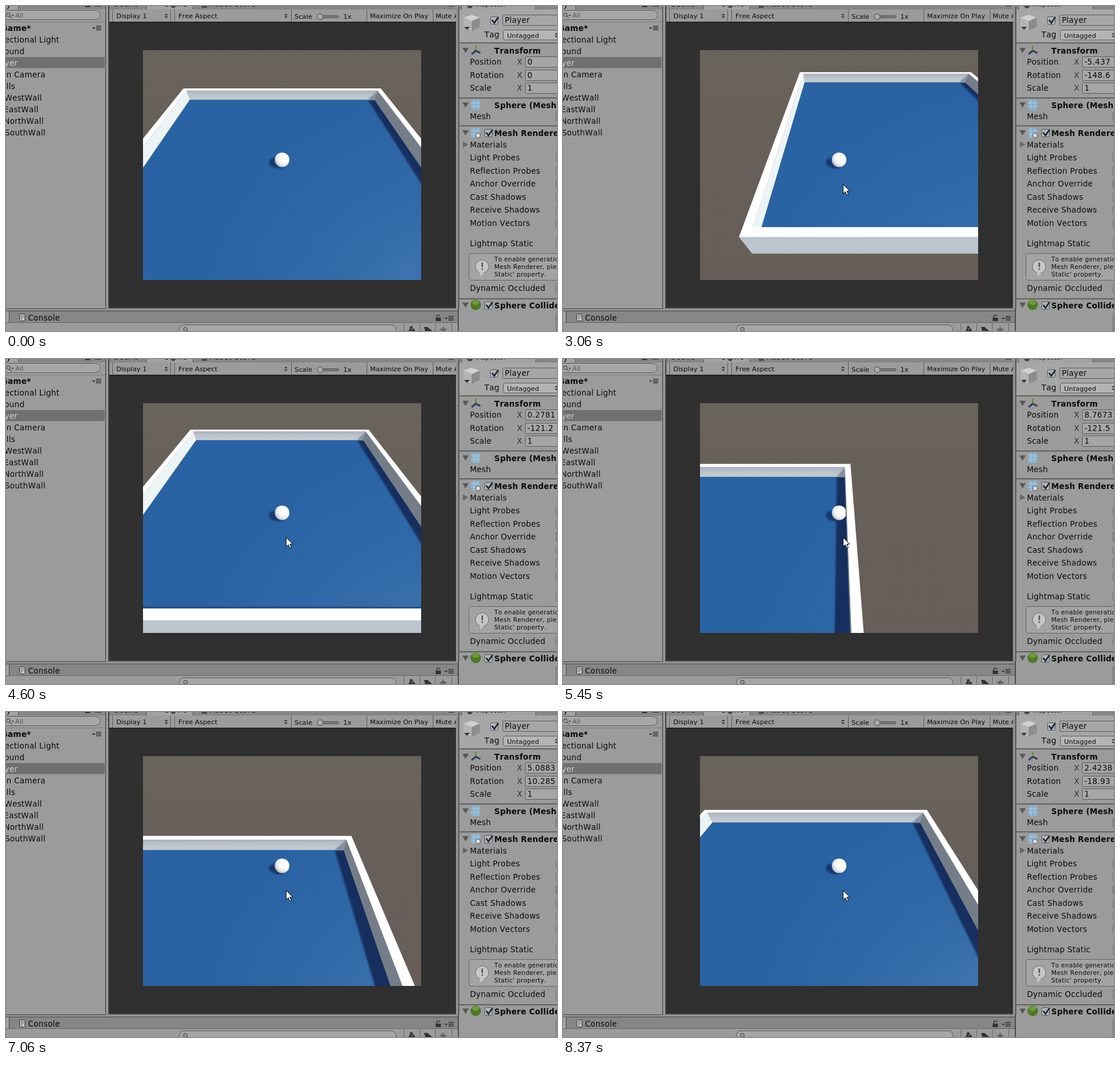
Animation, 949 px wide and 560 px high, one loop 8450 ms. Source, as an HTML page with a canvas:

```html
<!DOCTYPE html>
<html lang="en">
<head>
<meta charset="utf-8">
<title>Rolling ball in an editor</title>
<style>
html, body { margin: 0; width: 949px; height: 560px; overflow: hidden; background: #9b9b9b; }
svg, canvas { position: absolute; left: 0; top: 0; }
canvas { left: 236px; top: 76px; }
text { font: 13.4px "DejaVu Sans", sans-serif; letter-spacing: .25px; font-kerning: none; fill: #0a0a0a; white-space: pre; }
.b { font-weight: bold; font-size: 13.4px; }
.s { font-size: 11.2px; letter-spacing: .05px; }
.h { font-size: 10.5px; letter-spacing: .28px; }
.e { text-anchor: end; }
</style>
</head>
<body>
<svg id="ui" width="949" height="560"></svg>
<canvas id="view" width="479" height="396"></canvas>
<script>
// ---------- editor panels ----------
const PANEL = '#9b9b9b', STRIP = '#868686', TAB = '#a2a2a2';
const rect = (x, y, w, h, fill, more = '') =>
  `<rect x="${x}" y="${y}" width="${w}" height="${h}" fill="${fill}" ${more}/>`;
const path = (d, fill, more = '') => `<path d="${d}" fill="${fill}" ${more}/>`;
const text = (x, y, s, cls = '', more = '') => `<text x="${x}" y="${y}" class="${cls}" ${more}>${s}</text>`;
const line = (d, color = '#555', w = 1) => path(d, 'none', `stroke="${color}" stroke-width="${w}"`);
const field = (x, y, w, h, rx = 1, fill = '#a6a6a6') =>
  rect(x + .5, y + .5, w, h, fill, `rx="${rx}" stroke="#5c5c5c"`);
const stepper = (x, y) => path(`M${x} ${y - 1}h6l-3-3zM${x} ${y + 1}h6l-3 3z`, '#333');
const foldout = y => path(`M786 ${y}h11l-5.5 9z`, '#585858');
const check = (x, y) => rect(x + .5, y + .5, 13, 13, '#b4b4b4', 'rx="2" stroke="#555"') +
  line(`M${x + 3} ${y + 6}l4 5l7-10`, '#16243c', 2.6);
const menu = (x, y) => path(`M${x} ${y + 2}h6l-3 3z`, '#333') +
  line(`M${x + 7} ${y}h9m-9 3h9m-9 3h9`, '#333', 1.4);
const lens = (x, y) => `<circle cx="${x}" cy="${y}" r="3" fill="none" stroke="#555" stroke-width="1.3"/>` +
  line(`M${x + 2} ${y + 2}l4 4`, '#555', 1.5);

const hierarchy = () => rect(0, 0, 171, 521, PANEL) + rect(0, 0, 171, 6, STRIP) +
  rect(0, 0, 21, 6, TAB) + rect(21, 0, 1, 6, '#555') +
  text(9, 2, 'y', 'e') + rect(136, 0, 9, 2, '#333') + rect(153, 0, 12, 1, '#333') +
  field(-20, 7, 182, 16, 8) + lens(4, 15) + path('M9 15h5l-2.5 3z', '#555') +
  text(16, 20, 'All', 's', 'style="fill:#555"') + rect(0, 27, 171, 1, '#7d7d7d') +
  text(43, 43, 'Game*', 'b e') + menu(148, 35) + rect(0, 88, 170, 19, '#707070') +
  [['Directional Light', 92], ['Ground', 32], ['Player', 20], ['Main Camera', 68], ['Walls', 16],
   ['WestWall', 62], ['EastWall', 56], ['NorthWall', 65], ['SouthWall', 68]]
    .map(([s, x], i) => text(x, 63 + 20 * i, s, 'e', i == 2 ? 'style="fill:#d0d0d0"' : '')).join('') +
  rect(171, 0, 1.5, 522, '#444') + rect(172.5, 0, 3, 522, PANEL);

const gamePanel = () => rect(176, 0, 600, 521, '#414141') + rect(178, 0, 597, 7, STRIP) +
  rect(242, 0, 80, 6, TAB) + line('M242 0v6M322 0v6') +
  text(186, 1, 'Scene') + text(271, 1, 'Game') + text(351, 1, 'Asset Store') +
  '<circle cx="288" cy="0" r="3.5" fill="#444"/>' + rect(337, 0, 9, 3, '#444') + rect(762, 0, 10, 1, '#333') +
  rect(178, 6, 597, 21, PANEL) + rect(178, 27, 597, 492, '#303030') +
  rect(178, 27, 597, 2, '#222') +
  line('M183.5 6v21M283.5 6v21M290.5 6v21M491.5 6v21M621.5 6v21M735.5 6v21', '#5d5d5d') +
  text(190, 21, 'Display 1', 's') + stepper(273, 17) + text(297, 21, 'Free Aspect', 's') + stepper(479, 17) +
  text(497, 22, 'Scale', 's') + field(536, 16, 37, 4, 2, '#777') +
  '<circle cx="541" cy="18.5" r="5" fill="#aaa" stroke="#444"/>' + text(581, 22, '1x', 's') +
  text(627, 21, 'Maximize On Play', 's') + text(740, 21, 'Mute Audio', 's') +
  rect(775, 0, 6, 521, '#929292') + rect(779, 0, 1.5, 521, '#444');

const bottomPanel = () => rect(0, 521, 780, 5, '#929292') + rect(0, 521, 172, 1, '#444') +
  rect(0, 525, 778, 1, '#4b4b4b') + rect(0, 526, 778, 20, STRIP) + rect(0, 526, 5, 20, TAB) +
  line('M5.5 526v20', '#444') + rect(23.5, 530.5, 9, 12, '#ccc', 'stroke="#333" rx="1"') +
  line('M25 533h6m-6 3h6m-6 3h4', '#444') + text(38, 542, 'Console') +
  rect(740, 537, 9, 6, '#333') + line('M742 537v-2a2.5 2.5 0 0 1 5 0', '#333', 1.4) + menu(755, 535) +
  rect(0, 546, 778, 14, PANEL) + rect(0, 545, 778, 1, '#686868') + field(298, 549, 373, 18, 8) + lens(309, 557) +
  line('M685.5 547v13M712.5 547v13M739.5 547v13M767.5 547v13', '#666') +
  '<circle cx="698" cy="554" r="2.5" fill="#333"/>' + path('M693 560l3-5l3 3l3-3l3 5z', '#333') +
  path('M720 553h6l8 7h-12z', '#333') + path('M753 551l2 5h5l-4 4h-6l-4-4h5z', '#666') +
  rect(778, 521, 2, 39, '#4b4b4b');

const inspector = () => rect(781, 0, 168, 560, PANEL) + rect(781, 0, 168, 6, STRIP) +
  rect(784, 0, 128, 6, TAB) + line('M784.5 0v6M912.5 0v6') + text(809, 1, 'Inspector', 's') +
  '<circle cx="799" cy="-1" r="5" fill="#444"/>' + rect(781, 6, 168, 57, '#a6a6a6') +
  path('M788 20l14-5l14 5l-14 6z', '#d0d0d0') + path('M788 20l14 6v17l-14-7z', '#b4b4b4') +
  path('M816 20l-14 6v17l14-7z', '#8c8c8c') + path('M789 36h10l-5 5z', '#333') +
  check(834, 18) + field(855, 15, 110, 18) + text(859, 29, 'Player') + text(824, 54, 'Tag') +
  field(856, 41, 110, 17, 3, '#b4b4b4') + text(863, 55, 'Untagged', 's') + stepper(945, 50) +
  line('M781 63.5h168', '#4c4c4c', 1.5) + line('M781 158.5h168M781 206.5h168M781 504.5h168', '#4c4c4c', 1.5) +
  [72, 166, 214, 511].map(foldout).join('') + path('M787 233v11l9-5.5z', '#666') +
  line('M809 77v-9', '#6d8a2b', 2.5) + line('M809 77l-7 6', '#263f78', 3) + line('M809 77l8 4', '#2b3a52', 3) +
  text(841, 82, 'Transform', 'b') +
  ['Position', 'Rotation', 'Scale'].map((s, i) => {
    const y = [101, 124, 146][i];
    return text(799, y, s) + text(880, y, 'X', '', 'style="fill:#333"') + field(894, y - 14, 80, 18) +
      text(898, y, i < 2 ? '0' : '1', '', `id="n${i}"`);
  }).join('') +
  [162, 210].map(y => rect(801, y, 16, 17, '#86b0cf', 'rx="3"') +
    line(`M801 ${y + 5}h16m-16 6h16M806 ${y}v17m6-17v17`, '#aecbde')).join('') +
  '<circle cx="813" cy="223" r="4" fill="#ddd" stroke="#555"/>' +
  text(841, 176, 'Sphere (Mesh Filter)', 'b') + text(799, 195, 'Mesh') + field(947, 182, 9, 16) +
  check(824, 212) + text(841, 224, 'Mesh Renderer', 'b') +
  [['Materials', 244], ['Light Probes', 266], ['Reflection Probes', 289], ['Anchor Override', 311],
   ['Cast Shadows', 334], ['Receive Shadows', 356], ['Motion Vectors', 379], ['Lightmap Static', 414],
   ['Dynamic Occluded', 491]].map(([s, y], i) => text(799, y, s) +
    (i ? field(947, y - 13, 9, 16, 2, i == 3 ? '#a0a0a0' : '#bcbcbc') : '')).join('') +
  rect(797.5, 426.5, 170, 46, '#a3a3a3', 'rx="4" stroke="#666"') +
  '<circle cx="820" cy="449" r="11.5" fill="#c6c6c6" stroke="#666"/>' +
  path('M816 459l1 7l7-6z', '#c6c6c6') + rect(819, 442, 2.5, 8, '#555') + rect(819, 452, 2.5, 2.5, '#555') +
  ['To enable generation of', 'Mesh Renderer, please', "Static' property."]
    .map((s, i) => text(841, 440 + 13 * i, s, 'h')).join('') +
  '<circle cx="809" cy="515" r="9" fill="#4d7a22"/><ellipse cx="809" cy="511" rx="6" ry="4" fill="#6f9c3c"/>' +
  check(824, 509) + text(841, 521, 'Sphere Collider', 'b') + field(947, 529, 9, 40);

document.getElementById('ui').innerHTML = hierarchy() + gamePanel() + bottomPanel() + inspector();
const readouts = [0, 1].map(i => document.getElementById('n' + i));

// ---------- motion: step, ball x, ball z, shown position, shown rotation ----------
const START = 1440, STEP = 77, LOOP = 8450, LIMIT = 9.25;
const keys = [
  [-1, 0, 0, 0, 0], [3, -.17, -.01, -.06, -.4], [7, -.75, -.16, -.479, -4.059],
  [10, -1.6, -.75, -1.25, -18], [15, -3.5, -2.3, -3.15, -75], [21, -5.55, -4.47, -5.437, -148.6],
  [24, -5.8, -5.6, -5.78, -170], [28, -5.3, -6.15, -5.5, -160], [33, -3.6, -5.6, -4, -138],
  [41, .29, -3.13, .2781, -121.2], [47, 4.75, .4, 4.2, -121.3], [52, 9.25, 4.54, 8.7673, -121.5],
  [54, 11, 6.25, 10.5, -112], [58, 9.5, 9.7, 9.6, -85], [62, 8.2, 9.8, 8.5, -50],
  [67, 6.6, 8.9, 6.9, -12], [73, 4.87, 7.39, 5.0883, 10.285], [81, 3.5, 5.4, 3.75, 2],
  [90, 2.15, 3.29, 2.4238, -18.93]];

const secant = (i, c) => (keys[i + 1][c] - keys[i][c]) / (keys[i + 1][0] - keys[i][0]);
function tangent(i, c) {
  if (!i) return 0;
  const a = secant(i - 1, c);
  if (i == keys.length - 1) return a;
  const b = secant(i, c);
  return a * b > 0 ? 2 * a * b / (a + b) : 0;
}
function curve(k, c) {
  const i = keys.findIndex(r => r[0] >= k);
  if (i < 1) return keys[0][c];
  const [p, q] = [keys[i - 1], keys[i]], w = q[0] - p[0], u = (k - p[0]) / w, v = 1 - u;
  return p[c] * v * v * (1 + 2 * u) + q[c] * u * u * (3 - 2 * u) +
    w * u * v * (v * tangent(i - 1, c) - u * tangent(i, c));
}
const bound = v => Math.max(-LIMIT, Math.min(LIMIT, v));
const show = v => v ? v.toFixed(5).slice(0, 6) : '0';

// ---------- game view ----------
const g = document.getElementById('view').getContext('2d');
g.translate(-236, -76);
const blend = (grad, ...colors) => {
  colors.forEach((c, i) => grad.addColorStop(i / (colors.length - 1), c));
  return grad;
};
const sky = blend(g.createLinearGradient(0, 76, 0, 472), '#69645c', '#675f59', '#675e59');
const felt = blend(g.createRadialGradient(760, 570, 0, 760, 570, 430), '#477cb8', '#336ba9', '#2963a4');
const shine = blend(g.createRadialGradient(480, 261, 3, 480, 261, 19), '#fff', '#fdfdfd', '#e8e9ec', '#a9adb5');
const SHADE = '#162f5f', IN = 9.75, OUT = 10.25;
let bx = 0, bz = 0;

// Camera sits 10 above and 10 behind the ball, pitched down 45 degrees
function project([x, y, z]) {
  const d = Math.max(z - bz + 10, 1), h = y - 10;
  return [475.5 + 485 * (x - bx) / (d - h), 274 - 342.95 * (d + h) / (d - h)];
}
function shape(fill, ...loops) {
  g.beginPath();
  for (const pts of loops) {
    pts.forEach((p, i) => g[i ? 'lineTo' : 'moveTo'](...project(p)));
    g.closePath();
  }
  g.fillStyle = fill;
  g.fill('evenodd');
}
const flat = (x0, x1, z0, z1, y) => [[x0, y, z0], [x1, y, z0], [x1, y, z1], [x0, y, z1]];
const side = (x, z0, z1) => [[x, 0, z0], [x, 1, z0], [x, 1, z1], [x, 0, z1]];

function soft(blur, draw) {
  g.filter = `blur(${blur}px)`;
  draw();
  g.filter = 'none';
}

function drawBall() {
  g.save();
  g.beginPath();
  g.arc(475.5, 265, 12.6, 0, 7);
  g.fillStyle = shine;
  g.fill();
  // the east wall shades the side that touches it
  g.clip();
  g.fillStyle = '#757d89';
  g.fillRect(project([IN - .05, .5, bz])[0], 250, 300, 30);
  g.restore();
}

function drawScene() {
  g.fillStyle = sky;
  g.fillRect(236, 76, 479, 396);
  shape(felt, flat(-IN, IN, -IN, IN, 0));

  const oval = Array.from({ length: 32 }, (_, i) => {
    const a = i * Math.PI / 16, u = .645 * Math.cos(a), v = .5 * Math.sin(a);
    return [bx - .35 - .857 * u + .514 * v, 0, bz + .21 + .514 * u + .857 * v];
  });
  soft(1.5, () => {
    shape(SHADE, flat(9.05, 10, -IN, IN, 0));
    shape(SHADE, flat(-IN, IN, -IN, -9.33, 0));
    shape('#17386c', oval);
  });

  const top = project([0, 1, IN])[1], low = project([0, 0, IN])[1];
  shape(blend(g.createLinearGradient(0, top, 0, low), '#a9b1bc', '#bcc4cd', '#c5ccd4'),
    [[-IN, 0, IN], [-IN, 1, IN], [IN, 1, IN], [IN, 0, IN]]);
  soft(1, () => shape('#858b96', [[IN, 1, IN], [IN, 0, IN], [9.05, 0, IN]]));

  shape('#ecf4f6', side(-IN, -IN, IN));
  shape('#757d89', side(IN, -IN, IN));
  drawBall();

  shape('#fff', flat(-OUT, OUT, -OUT, OUT, 1), flat(-IN, IN, -IN, IN, 1));
  if (bz < -.3) shape('#bcc5ce', [[-OUT, 1, -OUT], [OUT, 1, -OUT], [OUT, -1, -OUT], [-OUT, -1, -OUT]]);
}

const arrow = new Path2D('M.5 .5v16l3.7-3.5l2.6 5.8l2.6-1.1l-2.6-5.7h5z');
function drawCursor(t) {
  if (t < 140) return;
  const far = [1, .6, .2, 0][Math.min(3, Math.floor((t - 139) / 76.7))];
  if (t >= 600 && t < 750) {
    for (const [r, c] of [[14, '#000'], [13, '#fff']]) {
      g.beginPath();
      g.arc(482, 307, r, 0, 7);
      g.strokeStyle = c;
      g.stroke();
    }
  }
  g.save();
  g.translate(482 + 201 * far, 307 + 136 * far);
  g.fillStyle = '#fff';
  g.strokeStyle = '#000';
  g.fill(arrow);
  g.stroke(arrow);
  g.restore();
}

function frame() {
  const t = performance.now() % LOOP;
  const k = t < START ? -1 : Math.min(90, Math.floor((t - START) / STEP + .05));
  bx = bound(curve(k, 1));
  bz = bound(curve(k, 2));
  drawScene();
  drawCursor(t);
  readouts[0].textContent = show(bound(curve(k, 3)));
  readouts[1].textContent = show(curve(k, 4));
  requestAnimationFrame(frame);
}
frame();
</script>
</body>
</html>
```
